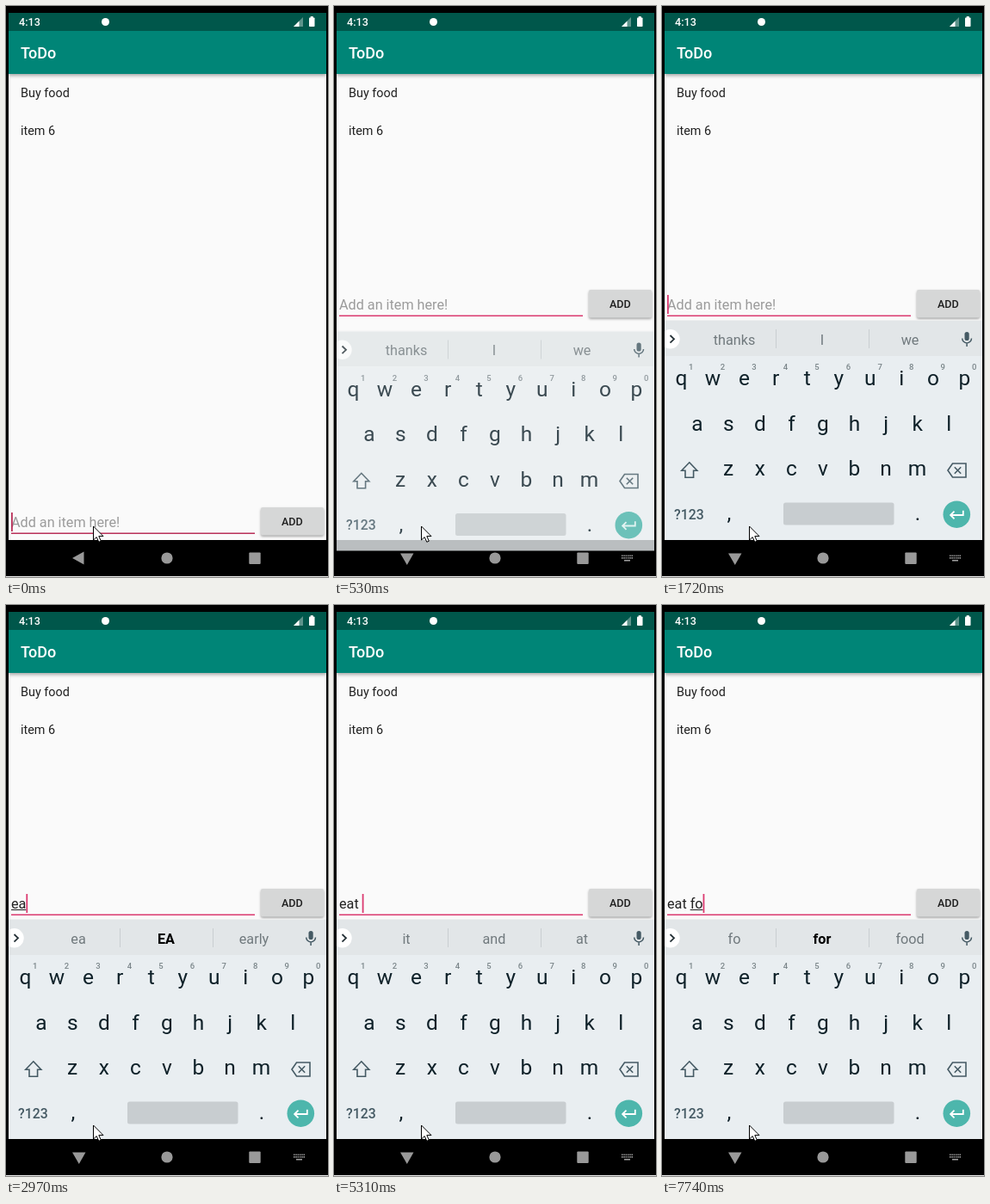
These frames come from a looping animation (374x664 px, 8 s). An HTML page with a canvas:

```html
<!DOCTYPE html>
<html>
<head>
<meta charset="utf-8">
<style>
html, body { margin: 0; width: 100%; height: 100%; overflow: hidden; background: #000; }
canvas { display: block; }
</style>
</head>
<body>
<canvas id="stage" width="374" height="664"></canvas>
<script>
const ctx = document.getElementById('stage').getContext('2d');
const LOOP = 8000;

// Each step: start time, committed text, underlined text, suggestions
const typing = [
  [0, '', '', ['thanks', 'I', 'we']],
  [1840, '', 'e', ['e', '*E', 'even']],
  [1980, '', 'ea', ['ea', '*EA', 'early']],
  [3260, '', 'eat', ['rat', '*eat', 'easy']],
  [3410, 'eat ', '', ['it', 'and', 'at']],
  [7450, 'eat ', 'f', ['f', '*F', 'find']],
  [7740, 'eat ', 'fo', ['fo', '*for', 'food']]
];
// The caret flips at each of these times, starting visible
const caretFlips = [410, 700, 1120, 1720, 2540, 2970, 3830, 4420, 4800, 5310, 5850, 6400, 6800, 7330];

function rect(x, y, w, h, color, radius = 0) {
  ctx.fillStyle = color;
  ctx.beginPath();
  ctx.roundRect(x, y, w, h, radius);
  ctx.fill();
}

function circle(x, y, r, color) {
  ctx.fillStyle = color;
  ctx.beginPath();
  ctx.arc(x, y, r, 0, Math.PI * 2);
  ctx.fill();
}

function text(str, x, y, size, color, { weight = 400, align = 'left' } = {}) {
  ctx.font = `${weight} ${size}px Roboto, sans-serif`;
  ctx.textAlign = align;
  ctx.fillStyle = color;
  ctx.fillText(str, x, y);
}

function path(d, x, y, { fill, stroke, width = 1.6 }) {
  ctx.save();
  ctx.translate(x, y);
  const shape = new Path2D(d);
  if (fill) { ctx.fillStyle = fill; ctx.fill(shape); }
  if (stroke) { ctx.strokeStyle = stroke; ctx.lineWidth = width; ctx.stroke(shape); }
  ctx.restore();
}

function shadowed(color, blur, dy, draw) {
  ctx.save();
  ctx.shadowColor = color;
  ctx.shadowBlur = blur;
  ctx.shadowOffsetY = dy;
  draw();
  ctx.restore();
}

function drawScreen() {
  rect(0, 0, 374, 664, '#000');
  rect(3, 8, 369, 613, '#fafafa');
  shadowed('rgba(0,0,0,.35)', 4, 1.5, () => rect(3, 29, 369, 50, '#008577'));
  rect(0, 29, 3, 60, '#000');
  rect(372, 29, 2, 60, '#000');
  rect(3, 8, 369, 21, '#00574b');

  text('4:13', 15, 23, 12.6, '#fff', { weight: 500 });
  circle(115.5, 18.5, 4.5, '#fff');
  path('M11 0V11H0Z', 334, 13, { fill: '#5d938b' });
  path('M6.5 4.5V11H0Z', 334, 13, { fill: '#fff' });
  rect(352, 13.5, 6.5, 10.5, '#fff', 0.8);
  rect(353.7, 12, 3, 2, '#fff');

  text('ToDo', 17, 61, 18, '#fff', { weight: 500 });
  text('Buy food', 17, 106.3, 14.4, '#212121');
  text('item 6', 17, 149.6, 14.4, '#212121');
}

function drawNavigation(keyboardOpening) {
  const gray = '#999';
  if (keyboardOpening) {
    path('M77 636.5H92.5L84.8 650Z', 0, 0, { fill: gray });
    for (let row = 0; row < 2; row++)
      for (let col = 0; col < 6; col++) rect(334 + col * 2.3, 638.5 + row * 2.6, 1.5, 1.6, gray);
    rect(337, 644, 7, 1.6, gray);
  } else {
    path('M77 642L90.5 634.5V649.5Z', 0, 0, { fill: gray });
  }
  circle(187, 642, 6.6, gray);
  rect(282.3, 635.5, 13.4, 13.4, gray, 1);
  rect(0, 663, 374, 1, '#e8e8e8');
}

function drawInput(bottom, [, done, composing], caretOn, accent) {
  ctx.save();
  ctx.translate(0, bottom - 363);
  const value = done + composing;
  text(value || 'Add an item here!', 6, 353, 16.2, value ? '#212121' : '#9b9b9b');
  const start = 6 + ctx.measureText(done).width;
  const end = value ? 6 + ctx.measureText(value).width : 6;
  if (composing) rect(start, 354, end - start, 1, '#212121');
  rect(6, 359.5, 283, 1.5, accent);
  if (caretOn) rect(end, 336, 1.8, 22, accent);
  shadowed('rgba(0,0,0,.35)', 3, 1.5, () => rect(296, 330, 73, 32.5, '#d6d7d7', 2));
  text('ADD', 332.3, 351, 12.6, '#212121', { weight: 500, align: 'center' });
  ctx.restore();
}

function drawSuggestions(words) {
  words.forEach((word, i) => {
    const bold = word[0] === '*';
    text(bold ? word.slice(1) : word, 84 + i * 102, 393.5, 16.2, bold ? '#000' : '#70797d',
      { weight: bold ? 700 : 400, align: 'center' });
  });
}

function drawKeyboard(words, offset, alpha) {
  const ink = '#0f2129', iconInk = '#455a64';
  ctx.save();
  ctx.globalAlpha = alpha;
  ctx.translate(0, offset);
  rect(3, 365, 369, 1, '#eff0f0');
  rect(3, 366, 369, 41, '#e2e6e8');
  rect(3, 407, 369, 214, '#e9eef1');

  ctx.save();
  ctx.beginPath();
  ctx.rect(3, 366, 369, 41);
  ctx.clip();
  circle(9.5, 387.3, 11.2, '#fff');
  ctx.restore();
  path('M9.5 383L14 387.3L9.5 391.6', 0, 0, { stroke: '#263238', width: 1.8 });
  rect(132, 376, 1, 22, '#c9ced1');
  rect(240, 376, 1, 22, '#c9ced1');
  rect(351.5, 379, 5.2, 10, iconInk, 2.6);
  path('M348.7 386.5a5.4 5.4 0 0 0 10.8 0M354.1 392V396', 0, 0, { stroke: iconInk, width: 1.5 });
  drawSuggestions(words);

  [['qwertyuiop', 22.5], ['asdfghjkl', 40.8], ['zxcvbnm', 77.2]].forEach(([keys, left], row) => {
    [...keys].forEach((key, i) => {
      const x = left + i * 36.55;
      text(key, x, 441 + row * 52.6, 24.5, ink, { align: 'center' });
      if (row === 0) text((i + 1) % 10, x + 11.3, 423.2, 9.5, '#7a8589', { weight: 500, align: 'center' });
    });
  });

  path('M0 -9.2L9 0.3H4.8V8.3H-4.8V0.3H-9Z', 31.8, 540, { stroke: iconInk });
  path('M-10.5 0L-5 -8H10.5V8H-5Z M-2.7 -3.7L4.7 3.7M4.7 -3.7L-2.7 3.7', 342.5, 540, { stroke: iconInk });
  text('?123', 14, 596.5, 15.8, iconInk, { weight: 500 });
  text(',', 77.8, 598, 24.5, ink, { align: 'center' });
  text('.', 297, 598, 24.5, ink, { align: 'center' });
  rect(141, 577.5, 128.5, 26, '#c8cdd0', 2.5);
  circle(342.3, 591.2, 15.8, '#4db6ac');
  path('M7.5 -4.5V0.8H-7M-2.8 -3.6L-7.2 0.8L-2.8 5.2', 342.3, 591.2, { stroke: '#fff', width: 1.8 });
  ctx.restore();
}

function drawPointer() {
  path('M0 0V16L3.7 12.6L6.3 18.3L8.8 17.2L6.3 11.6H11.5Z', 101.5, 605, { fill: '#fff', stroke: '#000', width: 1 });
}

function draw(t) {
  const step = typing.filter(s => t >= s[0]).pop();
  const flips = caretFlips.filter(time => t >= time).length;
  const opened = t >= 410;
  drawScreen();
  drawNavigation(t >= 260);
  drawInput(opened ? 363 : 616, step, flips % 2 === 0, opened ? '#db3a70' : '#b92f58');
  if (t >= 700) drawKeyboard(step[3], 0, 1);
  else if (t >= 530) drawKeyboard(step[3], 12.5, 0.8);
  drawPointer();
}

function tick() {
  draw(performance.now() % LOOP);
  requestAnimationFrame(tick);
}
tick();
</script>
</body>
</html>
```
